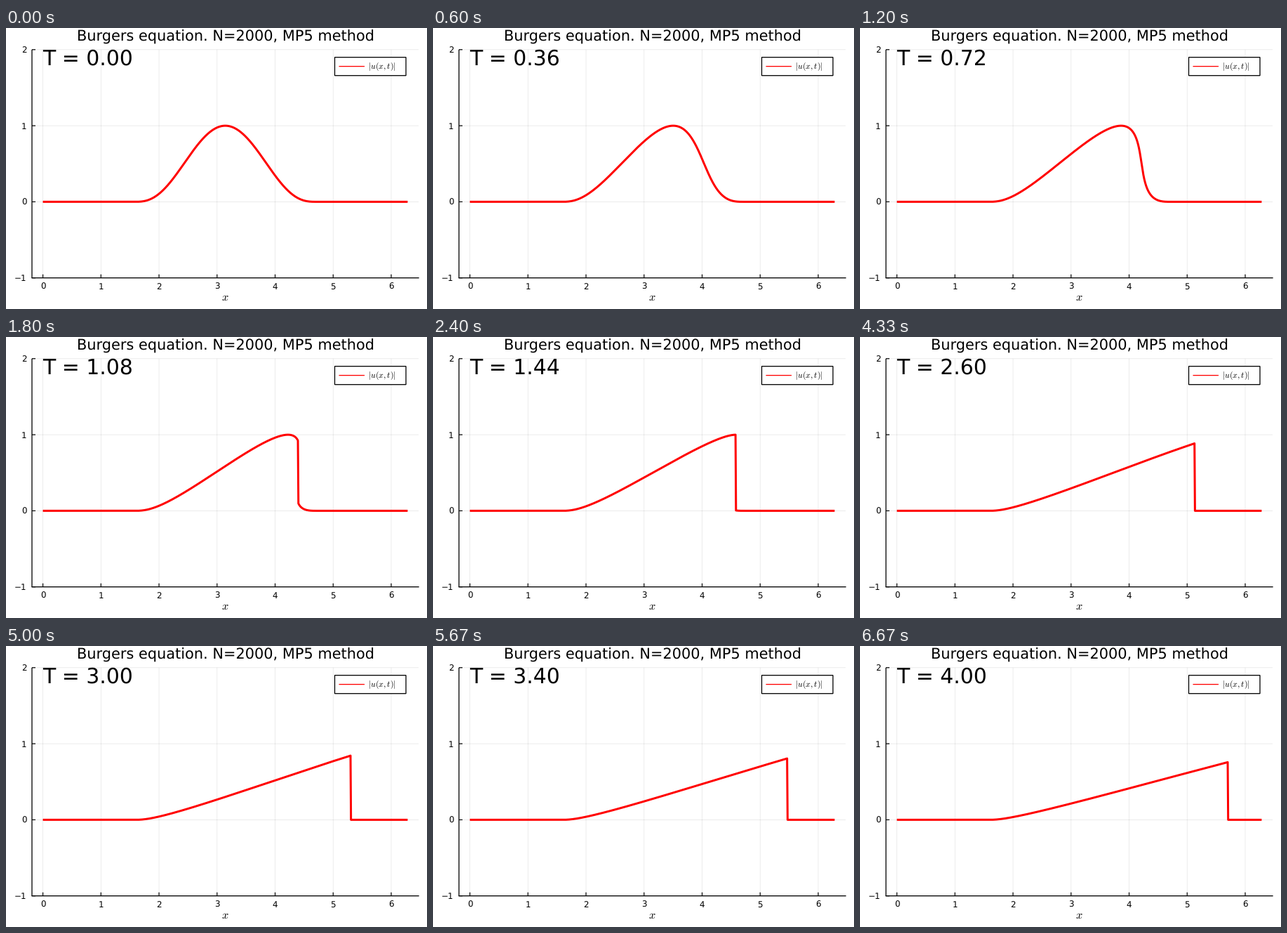
A matplotlib script for the animation above (6.74 s loop, 600 by 400 pixels).

```python
import numpy as np
import matplotlib.pyplot as plt
from matplotlib.animation import FuncAnimation
from matplotlib.patches import Rectangle

plt.rcParams.update({
    "font.family": "DejaVu Sans",
    "mathtext.fontset": "cm",
    "text.hinting": "none",
    "path.snap": False,
})

W, H, DPI = 600, 400, 100
PX = 72 / DPI                      # points per pixel
LEFT, RIGHT, TOP, BOTTOM = 37, 588, 30.8, 355.7
STEPS, DT = 101, 0.04
TICK_MS, TICKS = 20, 337           # 337 * 20 ms = one loop


def px(x):
    pad = 0.03 * 2 * np.pi
    return LEFT + (x + pad) * (RIGHT - LEFT) / (2 * np.pi + 2 * pad)


def py(y):
    return BOTTOM - (y + 1) * (BOTTOM - TOP) / 3


# Initial bump and its running integral
x0 = np.linspace(0, 2 * np.pi, 2001)
u0 = np.clip(1 - (2 * (x0 - np.pi) / np.pi) ** 2, 0, None) ** 3
mass = np.concatenate([[0], np.cumsum((u0[1:] + u0[:-1]) / 2 * np.diff(x0))])


def burgers(t):
    """Follow the characteristics and fit the shock by equal areas."""
    x = x0 + t * u0
    folded = np.flatnonzero(np.diff(x) < 0)
    if folded.size == 0:
        return x, u0
    i, j = folded[0] + 1, folded[-1] + 1
    area = mass + t * u0 ** 2 / 2
    probe = np.linspace(x[j], x[i - 1], 4000)
    gap = np.interp(probe, x[:i], area[:i]) - np.interp(probe, x[j:], area[j:])
    shock = probe[np.argmin(np.abs(gap))]
    ends = np.interp(shock, x[:i], u0[:i]), np.interp(shock, x[j:], u0[j:])
    half = 0.004
    a = x[:i] < shock - half
    b = x[j:] > shock + half
    xs = np.concatenate([x[:i][a], [shock - half, shock + half], x[j:][b]])
    us = np.concatenate([u0[:i][a], ends, u0[j:][b]])
    return xs, us


curves = [burgers(k * DT) for k in range(STEPS)]

fig = plt.figure(figsize=(W / DPI, H / DPI), dpi=DPI, facecolor="white")
ax = fig.add_axes([0, 0, 1, 1])
ax.set(xlim=(0, W), ylim=(H, 0))
ax.axis("off")


def line(xs, ys, width, color="black", **kw):
    kw.setdefault("solid_capstyle", "butt")
    return ax.plot(xs, ys, color=color, lw=width * PX, **kw)[0]


def text(x, y, s, size, ha="center"):
    return ax.text(x, y, s, fontsize=size * PX, ha=ha, va="baseline", zorder=5)


for n in range(7):
    x = px(n)
    line([x, x], [TOP, BOTTOM], 0.75, alpha=0.1)
    line([x, x], [BOTTOM, BOTTOM - 5], 1.2)
    text(x, 371.6, str(n), 11.9)
for n in range(-1, 3):
    y = py(n)
    line([LEFT, RIGHT], [y, y], 0.75, alpha=0.1)
    line([LEFT, LEFT + 5], [y, y], 1.2)
    text(29.3, y + 4.4, str(n).replace("-", "\u2212"), 11.9, "right")
line([LEFT, LEFT], [TOP, BOTTOM], 1.3)
line([LEFT, RIGHT], [BOTTOM, BOTTOM], 1.3, solid_capstyle="projecting")

text(312.5, 18.4, "Burgers equation. N=2000, MP5 method", 20.9)
text(312, 388, "$x$", 16.4)
clock = text(52.5, 52.7, "", 29.85, "left")
curve = line([], [], 3, "red", zorder=3)

ax.add_patch(Rectangle((468.5, 41.7), 101.5, 26, fc="white", ec="black",
                       lw=1.3 * PX, zorder=4))
line([474.5, 511], [54.6, 54.6], 1.3, "red", zorder=5)
text(516, 58.2, "$|u(x,t)|$", 11.9, "left")


def draw(i):
    ms = i * TICK_MS + TICK_MS / 2
    k = min(int((ms + 5) * 0.015), STEPS - 1)
    x, u = curves[k]
    curve.set_data(px(x), py(u))
    clock.set_text(f"T = {k * DT:.2f}")
    return curve, clock


anim = FuncAnimation(fig, draw, frames=TICKS, interval=TICK_MS,
                     repeat=True, repeat_delay=0)
plt.show()
```
